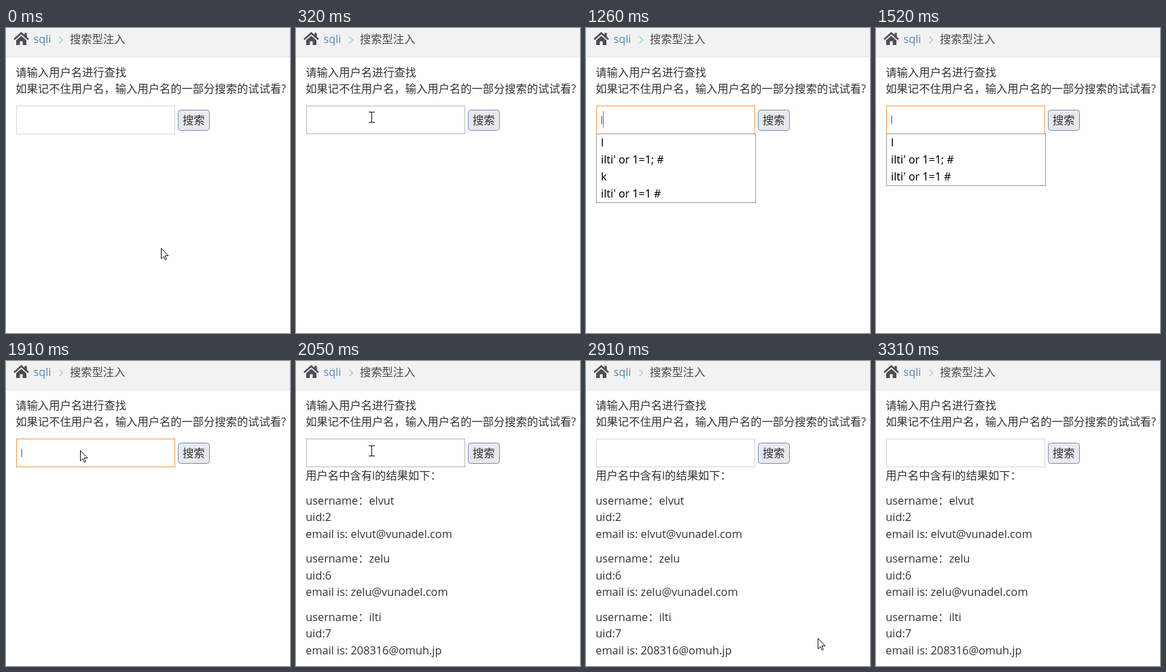
These frames come from a looping animation (418 by 448 pixels, 3640 ms). An HTML page:

```html
<!DOCTYPE html>
<html lang="zh-CN">
<head>
<meta charset="utf-8">
<title>搜索</title>
<style>
  html, body { margin: 0; width: 100%; height: 100%; overflow: hidden; background: #fff; }
  .stage { position: relative; width: 418px; height: 448px; overflow: hidden; }
  svg { position: absolute; left: 0; top: 0; }
  text { font: 16.3px "Open Sans", "Noto Sans CJK SC", "Noto Sans CJK", sans-serif; fill: #323232; white-space: pre; }
  .crumb { fill: #484848; }
  .link { fill: #5588bb; }
  .typed { fill: #696969; }

  .field, .caret, .typed, .results, .list, .drop, .arrow, .beam {
    animation: 3640ms step-end infinite;
  }
  .field { fill: #fff; animation-name: field; }
  .caret { fill: #757575; animation-name: caret; }
  .typed { animation-name: typed; }
  .results { animation-name: results; }
  .arrow { animation-name: arrow; }
  .beam { animation-name: beam; }

  .list {
    position: absolute; left: 15px; top: 155px; width: 233px;
    border: 1px solid #9a9a9a; background: #fff; color: #000;
    font: 16px/25px "Noto Sans", "Open Sans", sans-serif;
    animation-name: list;
  }
  .list div { height: 25px; padding-left: 6px; white-space: pre; overflow: hidden; }
  .list .drop { animation-name: drop; }

  /* idle, hover, focus, idle, hover, idle */
  @keyframes field {
    0% { stroke: #d5d5d5; }
    7.14% { stroke: #b5b5b5; }
    12.63% { stroke: #f59942; }
    54.39% { stroke: #d5d5d5; }
    56.31% { stroke: #b5b5b5; }
    76.37%, 100% { stroke: #d5d5d5; }
  }
  @keyframes caret {
    0% { visibility: hidden; transform: none; }
    12.63% { visibility: visible; transform: none; }
    27.19% { visibility: hidden; transform: none; }
    34.61% { visibility: visible; transform: translateX(4px); }
    41.75%, 100% { visibility: hidden; transform: none; }
  }
  @keyframes typed {
    0% { visibility: hidden; }
    34.61% { visibility: visible; }
    54.39%, 100% { visibility: hidden; }
  }
  @keyframes list {
    0% { visibility: hidden; }
    14.28% { visibility: visible; }
    51.64%, 100% { visibility: hidden; }
  }
  /* the row that no longer matches once a letter is typed */
  @keyframes drop {
    0% { height: 25px; }
    36.53%, 100% { height: 0; }
  }
  @keyframes results {
    0% { visibility: hidden; }
    54.39%, 100% { visibility: visible; }
  }
  @keyframes arrow {
    0% { visibility: visible; transform: translate(228px, 323px); }
    1.92% { visibility: visible; transform: translate(207px, 288px); }
    3.57% { visibility: visible; transform: translate(171px, 228px); }
    5.49% { visibility: visible; transform: translate(136px, 170px); }
    7.14% { visibility: hidden; transform: translate(109px, 131px); }
    52.47% { visibility: visible; transform: translate(109px, 131px); }
    56.31% { visibility: hidden; transform: translate(109px, 131px); }
    76.37% { visibility: visible; transform: translate(244px, 266px); }
    78.02% { visibility: visible; transform: translate(323px, 373px); }
    79.94% { visibility: visible; transform: translate(341px, 407px); }
    81.86% { visibility: visible; transform: translate(359px, 421px); }
    83.79% { visibility: visible; transform: translate(370px, 430px); }
    85.43% { visibility: visible; transform: translate(378px, 436px); }
    87.36% { visibility: visible; transform: translate(383px, 439px); }
    89.01% { visibility: visible; transform: translate(386px, 440px); }
    90.93%, 100% { visibility: hidden; transform: translate(386px, 440px); }
  }
  @keyframes beam {
    0% { visibility: hidden; transform: translate(116px, 139px); }
    7.14% { visibility: visible; transform: translate(116px, 139px); }
    8.79% { visibility: visible; transform: translate(111px, 131px); }
    17.85% { visibility: hidden; transform: translate(111px, 131px); }
    56.31% { visibility: visible; transform: translate(111px, 132px); }
    74.45% { visibility: visible; transform: translate(156px, 150px); }
    76.37%, 100% { visibility: hidden; transform: translate(156px, 150px); }
  }
</style>
</head>
<body>
<div class="stage">
  <svg width="418" height="448" viewBox="0 0 418 448">
    <!-- breadcrumb bar -->
    <rect width="418" height="42" fill="#f2f2f2"/>
    <rect y="42" width="418" height="1" fill="#e3e3e3"/>
    <g fill="#4c4d55">
      <path d="M12 16.8L22.5 7.6L33 16.8" fill="none" stroke="#4c4d55" stroke-width="2.6"/>
      <path d="M27.3 7.3h3.4v7h-3.4zM15 18L22.5 11.4L30 18V25H24.6V19.6H20.4V25H15z"/>
    </g>
    <text class="link" x="40.4" y="22">sqli</text>
    <path d="M78.5 12.5l5 5l-5 5" fill="none" stroke="#abcfd8" stroke-width="1.5"/>
    <text class="crumb" x="94" y="22">搜索型注入</text>

    <!-- search form -->
    <text x="14.3" y="71">请输入用户名进行查找</text>
    <text x="14.3" y="95">如果记不住用户名，输入用户名的一部分搜索的试试看?</text>
    <rect class="field" x="15.5" y="114.5" width="233" height="41"/>
    <text class="typed" x="21" y="141">l</text>
    <rect class="caret" x="21" y="122" width="1" height="24"/>
    <rect x="253.5" y="120.5" width="46" height="30" rx="4" fill="#e9e9ed" stroke="#6f8fc4"/>
    <text x="260" y="141">搜索</text>

    <g class="results">
      <text x="14.3" y="174">用户名中含有l的结果如下：</text>
      <text x="14.3" y="211">username：elvut</text>
      <text x="14.3" y="235">uid:2</text>
      <text x="14.3" y="260">email is: elvut@vunadel.com</text>
      <text x="14.3" y="296">username：zelu</text>
      <text x="14.3" y="321">uid:6</text>
      <text x="14.3" y="345">email is: zelu@vunadel.com</text>
      <text x="14.3" y="382">username：ilti</text>
      <text x="14.3" y="406">uid:7</text>
      <text x="14.3" y="431">email is: 208316@omuh.jp</text>
    </g>

    <!-- pointers -->
    <path class="arrow" d="M.5 .5V16L4 12.5L6.4 17.6L8.4 16.7L6.1 11.5H11z" fill="#fff" stroke="#111" stroke-linejoin="round"/>
    <path class="beam" d="M-4 -7.5H5M.5 -7.5V7.5M-4 7.5H5" fill="none" stroke="#111"/>
  </svg>

  <div class="list">
    <div>l</div>
    <div>ilti' or 1=1; #</div>
    <div class="drop">k</div>
    <div>ilti' or 1=1 #</div>
  </div>
</div>
</body>
</html>
```
